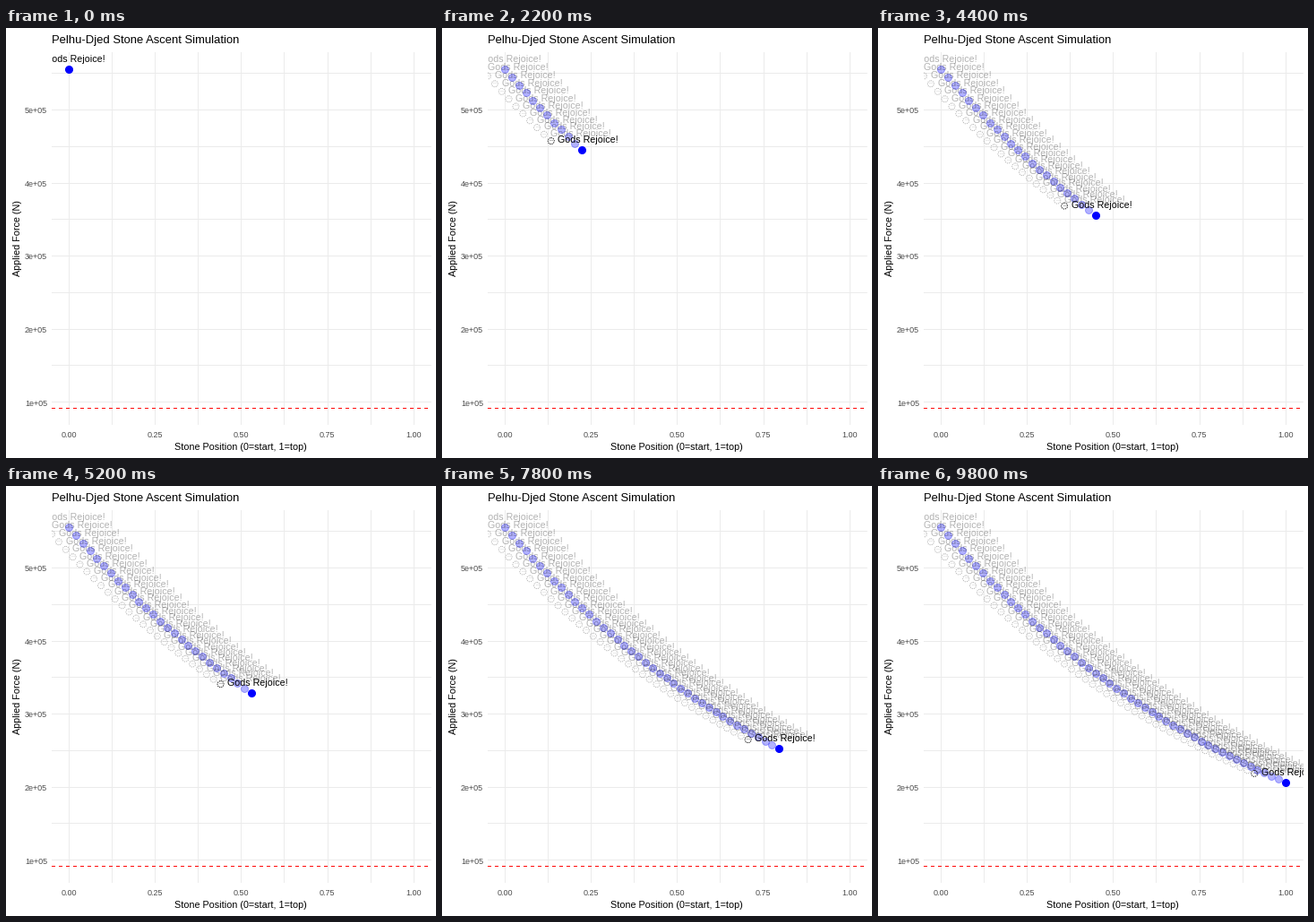
Write a matplotlib script that moves like this. It is 480 px wide and 480 px high and loops after 10 s.

```python
import math

import matplotlib.pyplot as plt
from matplotlib.animation import FuncAnimation
from matplotlib.patches import Circle, Rectangle

SIZE, STEPS, INTERVAL = 480, 50, 200
LEFT, RIGHT, TOP, BOTTOM = 51, 474.7, 27, 443
START_FORCE, DECAY, FRICTION = 5.557e5, 0.993, 0.919e5
GRID, TICK = "#EBEBEB", "#4D4D4D"

plt.rcParams["font.family"] = "Liberation Sans"


def px(pos):
    return 69.95 + 384.85 * pos


def py(force):
    return 417.2 - (force - 1e5) * 81.55 / 1e5


def force_at(pos):
    return START_FORCE * math.exp(-DECAY * pos)


fig = plt.figure(figsize=(SIZE / 72, SIZE / 72), dpi=72, facecolor="white")
ax = fig.add_axes([0, 0, 1, 1])
ax.set_xlim(0, SIZE)
ax.set_ylim(SIZE, 0)
ax.axis("off")
panel = Rectangle((LEFT, TOP), RIGHT - LEFT, BOTTOM - TOP,
                  transform=ax.transData)


def rule(xs, ys, **style):
    """Crisp one-pixel line through pixel centres."""
    return ax.plot(xs, ys, lw=1, snap=False, solid_capstyle="butt",
                   dash_capstyle="butt", **style)


# grid, major and minor
for k in range(9):
    x = round(px(k / 8)) + 0.5
    rule([x, x], [TOP, BOTTOM], color=GRID, zorder=1)
    if k % 2 == 0:
        ax.text(px(k / 8), 457.3, f"{k / 8:.2f}", size=9, color=TICK,
                ha="center", va="baseline")
for k in range(2, 12):
    y = round(py(k * 5e4)) + 0.5
    rule([LEFT, RIGHT], [y, y], color=GRID, zorder=1)
    if k % 2 == 0:
        ax.text(46, py(k * 5e4) + 4.4, f"{k // 2}e+05", size=9, color=TICK,
                ha="right", va="baseline")

ax.text(51, 17, "Pelhu-Djed Stone Ascent Simulation", size=13, va="baseline")
ax.text(262.3, 471, "Stone Position (0=start, 1=top)", size=10.8,
        ha="center", va="baseline")
ax.text(18.4, 234.7, "Applied Force (N)", size=10.8, rotation=90,
        ha="right", va="center")

y = round(py(FRICTION)) + 0.5
rule([LEFT, RIGHT], [y, y], color="red", dashes=(4, 4), zorder=2)

xs = [px(i / (STEPS - 1)) for i in range(STEPS)]
ys = [py(force_at(i / (STEPS - 1))) for i in range(STEPS)]


def stones(alpha):
    line, = ax.plot([], [], "o", color="blue", ms=8, mew=1, alpha=alpha,
                    zorder=3)
    line.set_clip_path(panel)
    return line


def label(x, y, order):
    """Ring symbol followed by the caption, centred above a stone."""
    z = 4 + order / 100
    cx, cy = x - 34.6, y - 10
    ring = Circle((cx, cy), 3.5, fill=False, ec="black", lw=0.9,
                  ls=(0, (1.4, 1.1)), zorder=z)
    ax.add_patch(ring)
    bar, = ax.plot([cx - 1.5, cx + 1.5], [cy - 1, cy - 1], color="black",
                   lw=0.6, dashes=(1, 1), zorder=z)
    text = ax.text(x - 27, y - 7.7, "Gods Rejoice!", size=10.6,
                   va="baseline", zorder=z)
    parts = [ring, bar, text]
    for part in parts:
        part.set_clip_on(True)
        part.set_clip_path(panel)
    return parts


trail, stone = stones(0.3), stones(1)
labels = [label(x, y, i) for i, (x, y) in enumerate(zip(xs, ys))]


def update(n):
    trail.set_data(xs[:n], ys[:n])
    stone.set_data([xs[n]], [ys[n]])
    for i, parts in enumerate(labels):
        for part in parts:
            part.set_visible(i <= n)
            part.set_alpha(1 if i == n else 0.3)
    return []


anim = FuncAnimation(fig, update, frames=STEPS, interval=INTERVAL,
                     init_func=lambda: update(0), repeat=True,
                     repeat_delay=0, blit=False)
plt.show()
```
